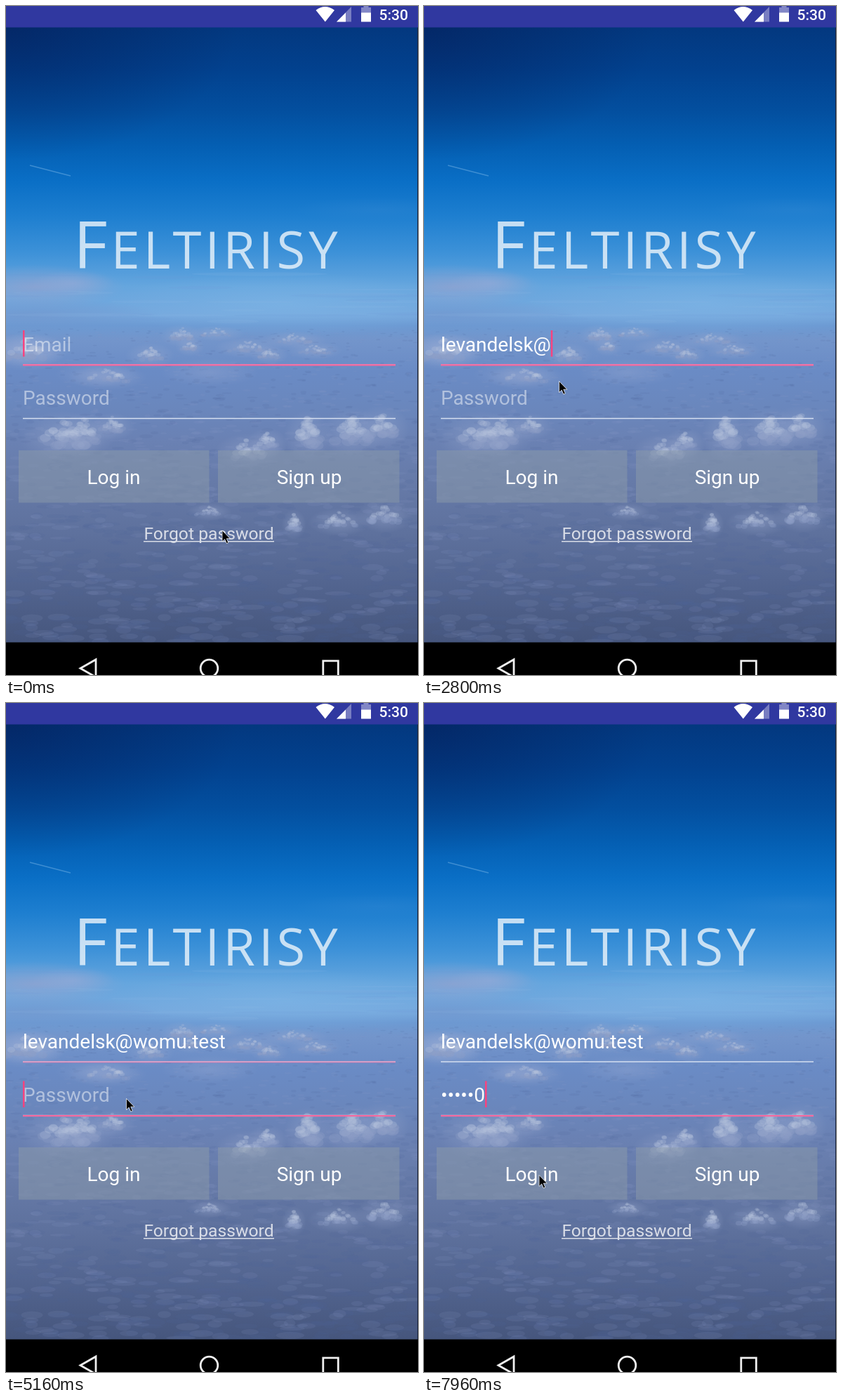
Animation, 587 px wide and 953 px high, one loop 8000 ms. Source, as an HTML page with a canvas:

```html
<!DOCTYPE html>
<html lang="en">
<head>
<meta charset="utf-8">
<title>Login screen</title>
<style>
  html, body { margin: 0; width: 100%; height: 100%; overflow: hidden; background: #000; }
  canvas, svg { position: absolute; left: 0; top: 0; width: 587px; height: 953px; }
  text { font: 28px Roboto, sans-serif; fill: #fff; white-space: pre; }
  .hint { fill: #fff; opacity: .48; }
  .mid { text-anchor: middle; }
  .small { font-size: 24.7px; fill: #d9dde7; }
  .clock { font-size: 21px; font-weight: 500; }
  .brand { font: 74px "Open Sans", sans-serif; letter-spacing: 5px; fill: #e9f3fb; opacity: .82; }
  .brand .cap { font-size: 94px; }
  .line { fill: #d5dff0; }
  .pink { fill: #f3699f; }
  .button { fill: #8b99ab; opacity: .52; }
  .nav { fill: none; stroke: #f0f0f0; stroke-width: 2.8; }
</style>
</head>
<body>
<canvas id="sky" width="587" height="953"></canvas>
<svg viewBox="0 0 587 953">
  <rect width="587" height="30.5" fill="#3038a0"/>
  <g fill="#fff">
    <path d="M441.500 6Q454.500-4 468 6L454.800 22.500Z"/>
    <path d="M492 1V22.500H471Z" opacity=".35"/>
    <path d="M484 9.500V22.500H471Z"/>
    <path d="M506 2H509.500V0H516.500V2H520V10H506Z" opacity=".4"/>
    <path d="M506 9.500H520V22.500H506Z"/>
  </g>
  <text class="clock" x="531.500" y="20">5:30</text>

  <text class="brand" x="96" y="374"><tspan class="cap">F</tspan>ELTIRISY</text>

  <text id="mailHint" class="hint" x="24" y="492">Email</text>
  <text id="mail" x="24" y="492"></text>
  <rect class="line" x="24" y="510.300" width="531" height="1.500"/>
  <rect id="mailLine" class="pink" x="24" y="510.200" width="531" height="2.400"/>

  <text id="passHint" class="hint" x="24" y="568">Password</text>
  <text id="pass" x="24" y="568"></text>
  <rect class="line" x="24" y="586.800" width="531" height="1.500"/>
  <rect id="passLine" class="pink" x="24" y="587" width="531" height="2.200"/>

  <rect id="caret" width="2.500" height="37.500" fill="#f8437f"/>

  <rect class="button" x="18" y="633" width="271.500" height="74.500"/>
  <rect class="button" x="302" y="633" width="258.500" height="74.500"/>
  <text class="mid" x="153.500" y="681">Log in</text>
  <text class="mid" x="432" y="681">Sign up</text>
  <text class="mid small" x="289" y="760">Forgot password</text>
  <rect x="196" y="762" width="186" height="1.500" fill="#d9dde7"/>

  <rect y="906.500" width="587" height="47" fill="#000"/>
  <g class="nav">
    <path d="M106 943.500L128 931V956Z"/>
    <circle cx="289.500" cy="943.500" r="12.300"/>
    <path d="M451.800 932.800H473.300V956H451.800Z"/>
  </g>

  <path id="mouse" d="M0 0V16L3.700 12.600L6.300 18.600L8.800 17.500L6.300 11.700H11.300Z"
        fill="#000" stroke="#fff" stroke-opacity=".8" stroke-width=".9"/>
</svg>
<script>
const LOOP = 8000;
const ADDRESS = 'levandelsk@womu.test';
const SECRET = '483150';
const $ = id => document.getElementById(id);

// Each track is a list of [start time, value]; values hold until the next start.
const mailKeys = [[0, 0], [1020, 1], [1170, 3], [1320, 5], [2060, 6], [2360, 7], [2510, 8],
  [2660, 10], [2800, 11], [3390, 12], [3540, 13], [3690, 15], [3990, 17], [4130, 20]];
const passKeys = [[0, 0], [5900, 1], [6050, 2], [6190, 3], [6340, 4], [6490, 5], [6640, 6]];
const caretOn = [[0, 1], [430, 0], [870, 1], [1920, 0], [2060, 1], [3240, 0], [3390, 1],
  [4570, 0], [4870, 1], [5460, 0], [5900, 1], [6930, 0], [7080, 1], [7510, 0], [7960, 1]];
const mailGlow = [[0, 1], [4870, .85], [5020, .7], [5160, .5], [5310, .25], [5460, 0]];
const passGlow = [[0, 0], [4870, .3], [5020, .7], [5160, 1]];
const mousePath = [[0, [308, 747]], [140, [284, 700]], [280, [222, 585]], [430, [192.5, 534.5]],
  [3990, [192, 540]], [4130, [188, 555]], [4280, [178, 570]], [4430, [171.5, 563.5]],
  [6780, [172, 596]], [6930, [171, 651]], [7080, [166, 668]], [7230, [164, 672.5]]];

const at = (track, t) => track.reduce((value, [start, next]) => t >= start ? next : value, null);

function render(t) {
  const typed = at(mailKeys, t), secret = at(passKeys, t);
  $('mail').textContent = ADDRESS.slice(0, typed);
  $('pass').textContent = secret ? '•'.repeat(secret - 1) + SECRET[secret - 1] : '';
  $('mailHint').style.display = typed ? 'none' : '';
  $('passHint').style.display = secret ? 'none' : '';
  $('mailLine').style.opacity = at(mailGlow, t);
  $('passLine').style.opacity = at(passGlow, t);

  const inPass = t >= 4870;
  const width = $(inPass ? 'pass' : 'mail').getComputedTextLength();
  $('caret').setAttribute('x', 24 + width);
  $('caret').setAttribute('y', inPass ? 538.5 : 462);
  $('caret').style.opacity = at(caretOn, t);
  $('mouse').setAttribute('transform', `translate(${at(mousePath, t)})`);
}

function paintSky() {
  const c = $('sky').getContext('2d');
  let seed = 11;
  const rnd = () => (seed = seed * 16807 % 2147483647) / 2147483647;
  const spread = () => rnd() + rnd() - 1;

  const blob = (x, y, rx, ry, color, alpha) => {
    c.globalAlpha = alpha;
    c.fillStyle = color;
    c.beginPath();
    c.ellipse(x, y, rx, ry, 0, 0, 7);
    c.fill();
  };

  const soft = (x, y, rx, ry, rgb, alpha) => {
    const g = c.createRadialGradient(0, 0, 0, 0, 0, 1);
    g.addColorStop(0, `rgba(${rgb},${alpha})`);
    g.addColorStop(1, `rgba(${rgb},0)`);
    c.save();
    c.globalAlpha = 1;
    c.translate(x, y);
    c.scale(rx, ry);
    c.fillStyle = g;
    c.fillRect(-1, -1, 2, 2);
    c.restore();
  };

  // Mound of small puffs standing on (x, y).
  const cloud = (x, y, w, h) => {
    soft(x, y - h * .3, w * .8, h * .9, '160,174,210', .4);
    for (let i = 0; i < 34; i++) {
      const u = spread(), up = rnd() * (1 - Math.abs(u));
      const r = (1.2 - up * .6) * h * .13;
      blob(x + u * w / 2, y - up * h, r * 1.4, r, up > .25 ? '#b3bfdc' : '#8fa0c8', .3);
    }
  };

  const base = c.createLinearGradient(0, 30, 0, 906);
  [[30, '#03387f'], [90, '#02418e'], [150, '#034f9f'], [200, '#045fb3'], [250, '#0a6fc6'],
   [300, '#1e7fd0'], [350, '#3c91d8'], [400, '#66a6de'], [440, '#76a8dd'], [455, '#6c9ad3'],
   [475, '#7395cb'], [520, '#6a8bc5'], [570, '#6a87bd'], [620, '#6a81b3'], [680, '#667aa8'],
   [750, '#5e719d'], [820, '#536590'], [906, '#46567d']
  ].forEach(([y, color]) => base.addColorStop((y - 30) / 876, color));
  c.fillStyle = base;
  c.fillRect(0, 30, 587, 877);

  soft(0, 30, 330, 190, '4,24,80', .5);
  soft(400, 425, 260, 45, '130,185,232', .5);

  // Haze bank on the left and streaks above the horizon.
  soft(40, 400, 130, 32, '146,162,207', .75);
  soft(95, 395, 60, 18, '155,172,215', .5);
  soft(30, 440, 190, 24, '112,148,204', .7);
  soft(530, 290, 120, 18, '50,135,210', .35);
  for (let i = 0; i < 24; i++) {
    blob(rnd() * 587, 380 + rnd() * 75, 30 + rnd() * 70, 1 + rnd() * 2, i % 2 ? '#8bb4e2' : '#6a97d0', .14);
  }
  c.globalAlpha = .4;
  c.strokeStyle = '#8fc4ee';
  c.lineWidth = 1.4;
  c.beginPath();
  c.moveTo(34, 227);
  c.lineTo(92, 242);
  c.stroke();

  // Mottled cloud floor, coarser towards the viewer.
  for (let i = 0; i < 1500; i++) {
    const depth = Math.pow(rnd(), 1.2), y = 460 + depth * 446;
    const size = 1.5 + depth * 7;
    blob(rnd() * 587, y, size * (1 + rnd() * 1.5), size * (.3 + rnd() * .4),
      rnd() < .48 ? '#8e9ecb' : '#4f6699', .13);
  }
  soft(30, 490, 60, 24, '160,178,218', .55);
  soft(290, 522, 70, 20, '150,168,210', .4);
  soft(130, 525, 60, 18, '150,168,210', .4);

  [[250, 475, 38, 18], [262, 490, 26, 15], [205, 504, 44, 20], [30, 502, 70, 30],
   [345, 492, 60, 16], [375, 502, 34, 15], [410, 480, 60, 14], [440, 495, 50, 14],
   [300, 470, 50, 12], [145, 535, 70, 20], [80, 627, 76, 42], [110, 620, 60, 34],
   [152, 606, 40, 22], [430, 626, 42, 42], [493, 622, 56, 42], [535, 612, 50, 36],
   [345, 645, 60, 30], [372, 630, 36, 24], [410, 746, 22, 24], [475, 742, 56, 22],
   [540, 735, 50, 26], [290, 725, 40, 14]
  ].forEach(p => cloud(...p));

  c.globalAlpha = 1;
  c.fillStyle = '#15203c';
  c.fillRect(586, 30, 1, 877);
}

function tick(now) {
  render(now % LOOP);
  requestAnimationFrame(tick);
}

paintSky();
render(0);
requestAnimationFrame(tick);
</script>
</body>
</html>
```
